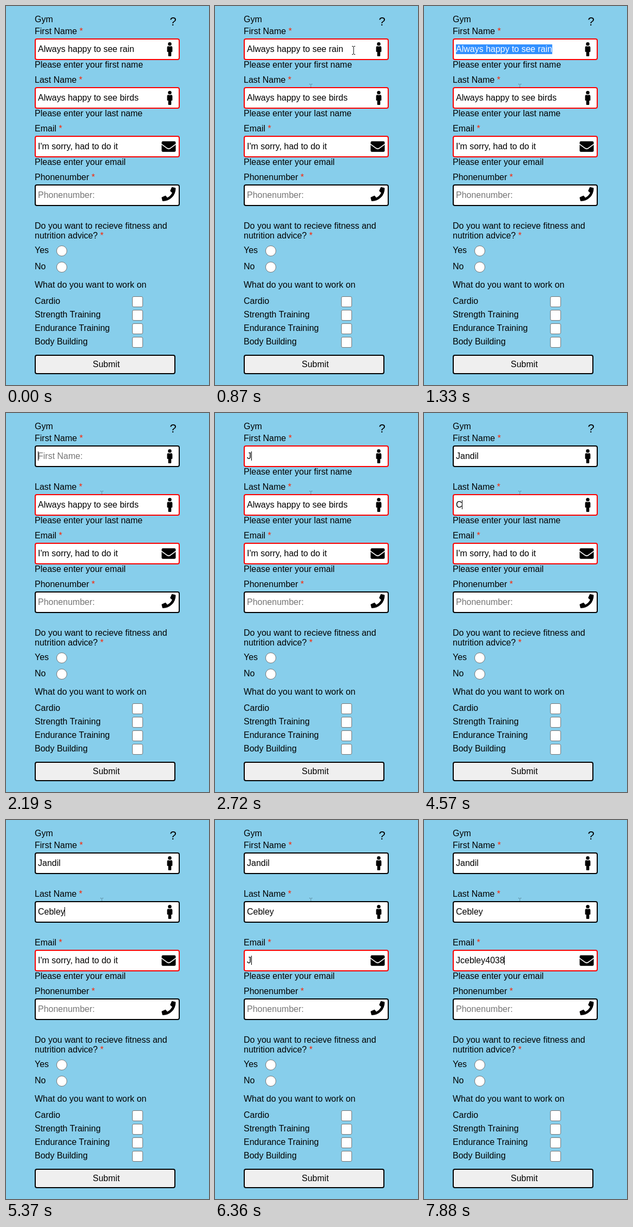
Recreate the animation shown at these times as an HTML page. Size 375 by 701 pixels, loop 8000 ms.

```html
<!DOCTYPE html>
<html lang="en">
<head>
<meta charset="utf-8">
<title>Gym form</title>
<style>
  html, body { margin: 0; width: 100%; height: 100%; overflow: hidden; background: skyblue; }
  svg { display: block; }
  text { font: 16px "Liberation Sans", Arial, sans-serif; white-space: pre; }
</style>
</head>
<body>
<svg id="stage" width="375" height="701" viewBox="0 0 375 701">
  <g id="page"></g>
  <g id="fields"></g>
  <g id="icons"></g>
  <g id="pointer" fill="none" stroke="#000"></g>
</svg>
<script>
const LOOP = 8000;
const LEFT = 53, TEXT_X = 59;
const RED = "#f00";

// keys: [time, number of typed characters]
const fields = [
  {
    y: 60, label: "First Name", hint: "Please enter your first name",
    before: "Always happy to see rain", typed: "Jandil",
    select: 1200, blur: 4110, validLength: 2,
    keys: [[2190, 0], [2720, 1], [2920, 2], [3060, 3], [3520, 5], [3650, 6]]
  },
  {
    y: 150, label: "Last Name", hint: "Please enter your last name",
    before: "Always happy to see birds", typed: "Cebley",
    select: 4110, blur: 5630, validLength: 2,
    keys: [[4570, 1], [4700, 2], [4770, 3], [5040, 4], [5370, 6]]
  },
  {
    y: 240, label: "Email", hint: "Please enter your email",
    before: "I'm sorry, had to do it", typed: "Jcebley4038",
    select: 5630, blur: Infinity, validLength: Infinity,
    keys: [[6360, 1], [6560, 2], [6660, 3], [6760, 4], [6960, 5], [7090, 7],
           [7420, 8], [7550, 9], [7680, 10], [7880, 11]]
  },
  { y: 330, label: "Phonenumber", before: "", typed: "", select: Infinity, blur: 0, keys: [] }
];

// [time, x, y] of the text cursor
const pointerSteps = [
  [590, 94, 216], [660, 135, 183], [730, 177, 151], [800, 217, 115], [870, 256, 82],
  [1130, 262, 84], [1200, 150, 74], [1270, 4, 51], [1330, -20, 45]
];

const byId = id => document.getElementById(id);
const ruler = document.createElement("canvas").getContext("2d");
ruler.font = '16px "Liberation Sans", Arial, sans-serif';
const widthOf = s => ruler.measureText(s).width;
const latest = (steps, t) => steps.filter(step => step[0] <= t).pop();

const text = (s, x, y, attrs = "") => `<text x="${x}" y="${y}" ${attrs}>${s}</text>`;
const box = (x, y, w, h, border, color, fill, radius) =>
  `<rect x="${x + border / 2}" y="${y + border / 2}" width="${w - border}" height="${h - border}"
    rx="${radius}" fill="${fill}" stroke="${color}" stroke-width="${border}"/>`;
const star = `<tspan fill="#f20"> *</tspan>`;

function drawPage() {
  let out = text("Gym", LEFT, 30) + text("?", 308.5, 36, 'text-anchor="middle" style="font-size:22px"');
  for (const f of fields) out += text(f.label + star, LEFT, f.y - 8);
  out += text("Do you want to recieve fitness and", LEFT, 412);
  out += text("nutrition advice?" + star, LEFT, 430);
  ["Yes", "No"].forEach((name, i) => {
    out += text(name, LEFT, 457 + 30 * i);
    out += `<circle cx="103" cy="${453 + 30 * i}" r="9.5" fill="#fff" stroke="#767676"/>`;
  });
  out += text("What do you want to work on", LEFT, 521);
  ["Cardio", "Strength Training", "Endurance Training", "Body Building"].forEach((name, i) => {
    out += text(name, LEFT, 551 + 25 * i);
    out += box(233, 537 + 25 * i, 20, 20, 1, "#767676", "#fff", 2.5);
  });
  out += box(LEFT, 645, 260, 36, 2, "#000", "#efefef", 3) + text("Submit", 160.3, 668);
  byId("page").innerHTML = out;
}

function drawIcons() {
  const person = y => `<g transform="translate(302.5 ${y})"><circle cy="10.3" r="3.25"/>
    <path d="M-2.5 14.3q2.5 1 5 0q2.4 0 2.4 2.4v7q0 1.2-1.2 1.2h-.9v6.9q0 1.2-1.2 1.2h-3.2
      q-1.2 0-1.2-1.2v-6.9h-.9q-1.2 0-1.2-1.2v-7q0-2.4 2.4-2.4z"/></g>`;
  const envelope = `<rect x="287.5" y="250.3" width="26" height="19.5" rx="2.4"/>
    <path d="M287 255.4L296.5 262.4Q300.5 265.8 304.5 262.4L314 255.4" fill="none" stroke="#fff" stroke-width="1.6"/>`;
  const phone = `<path d="M312.5 336.3L307.3 335Q306.3 334.8 305.9 335.7L303.4 341.4Q303.1 342.2 303.8 342.8
    L306.9 345.4Q304 351.5 297.9 354.4L295.4 351.3Q294.8 350.6 293.9 350.9L288.2 353.4Q287.3 353.8 287.5 354.8
    L288.8 360Q289 361 289.9 361A23.6 23.6 0 0 0 313.5 337.4Q313.5 336.5 312.5 336.3z"/>`;
  byId("icons").innerHTML = person(60) + person(150) + envelope + phone;
}

function selection(f, from, width) {
  const x = TEXT_X + from;
  return `<svg x="${x}" y="${f.y + 11}" width="${width - from}" height="18">
    <rect width="100%" height="100%" fill="#3390ff"/>${text(f.before, -from, 14, 'fill="#fff"')}</svg>`;
}

function drawField(f, t) {
  const key = latest(f.keys, t);
  const value = key ? f.typed.slice(0, key[1]) : f.before;
  const valid = !value || (key && key[1] >= f.validLength);
  const width = widthOf(value);
  const baseline = f.y + 25;

  let out = box(LEFT, f.y, 268, 40, 2, valid ? "#000" : RED, "#fff", 3);
  out += value ? text(value, TEXT_X, baseline) : text(f.label + ":", TEXT_X, baseline, 'fill="#757575"');
  if (!valid) out += text(f.hint, LEFT, f.y + 54);

  const clicked = f === fields[0] && t >= 1130 && t < f.select;
  if (!key && t >= f.select) {
    const dragging = f === fields[0] && t < 1270;
    out += selection(f, dragging ? 150 - TEXT_X : 0, width);
  } else if (clicked || (key && t < f.blur)) {
    out += `<rect x="${Math.floor(TEXT_X + width)}" y="${f.y + 11}" width="1" height="17"/>`;
  }
  return out;
}

function drawPointer(t) {
  const step = latest(pointerSteps, t);
  if (!step) return "";
  // a faint trace of the cursor stays above the second field
  const trace = t >= 800 ? `<path opacity=".3" d="M174 144.5h2l1 1 1-1h2M177 145.5v6"/>` : "";
  return trace + `<path transform="translate(${step[1]} ${step[2]})"
    d="M-3-7.5h2l1 1 1-1h2M0-6.5v13M-3 7.5h2l1-1 1 1h2"/>`;
}

function update(id, markup) {
  const node = byId(id);
  if (node.markup === markup) return;
  node.markup = markup;
  node.innerHTML = markup;
}

function render(now) {
  const t = now % LOOP;
  update("fields", fields.map(f => drawField(f, t)).join(""));
  update("pointer", drawPointer(t));
}

const start = performance.now();
function tick() {
  render(performance.now() - start);
  requestAnimationFrame(tick);
}

drawPage();
drawIcons();
tick();
</script>
</body>
</html>
```
